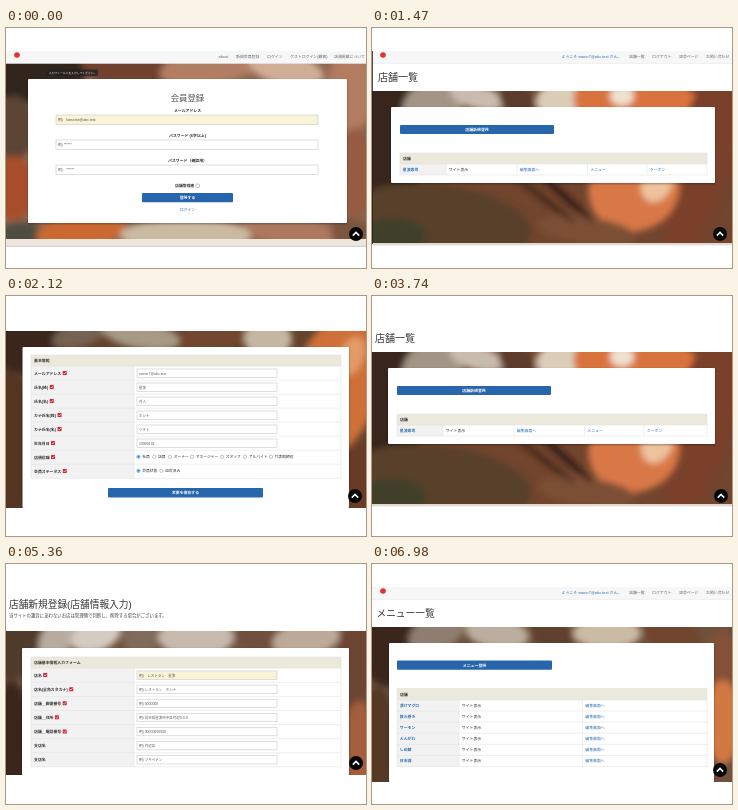
An HTML page that plays this animation: 360x240 px, repeating every 8 s.

```html
<!DOCTYPE html>
<html lang="ja">
<head>
<meta charset="utf-8">
<title>店舗管理デモ</title>
<style>
html, body { margin: 0; width: 100%; height: 100%; overflow: hidden; background: #fff; }
svg { display: block; width: 100vw; height: 100vh; }
text { font-family: "Liberation Sans", "Noto Sans CJK JP", "Noto Sans CJK", sans-serif; }
</style>
</head>
<body>
<svg id="stage" viewBox="0 0 360 240">
  <defs>
    <filter id="soft" x="-10%" y="-10%" width="120%" height="120%"><feGaussianBlur stdDeviation="3"/></filter>
    <filter id="shade"><feGaussianBlur stdDeviation="1.2"/></filter>
  </defs>
</svg>
<script>
const BLUE = '#2766ad', LINK = '#2f6db0', INK = '#333', LINE = '#ddd', HEAD = '#ebe8dc', CELL = '#f2f2f2';

const rect = (x, y, w, h, fill, extra = '') =>
  `<rect x="${x}" y="${y}" width="${w}" height="${h}" fill="${fill}" ${extra}/>`;
const text = (x, y, s, { size = 3.9, fill = INK, bold = false, anchor = 'start' } = {}) =>
  `<text x="${x}" y="${y}" font-size="${size}" fill="${fill}" text-anchor="${anchor}"${bold ? ' font-weight="700"' : ''}>${s}</text>`;
const line = (x1, y1, x2, y2, color = LINE, width = 0.5) =>
  `<path d="M${x1} ${y1}L${x2} ${y2}" stroke="${color}" stroke-width="${width}"/>`;
const ems = s => [...s].reduce((sum, c) => sum + (c < '\u0080' ? 0.34 : 1), 0);

// Soft background: blobs are [cx, cy, rx, ry, angle, color], cy measured from the top edge.
let clipCount = 0;
function photo(top, bottom, base, blobs) {
  const id = 'clip' + clipCount++;
  const shapes = blobs.map(([x, y, rx, ry, angle, color]) =>
    `<ellipse rx="${rx}" ry="${ry}" fill="${color}" transform="translate(${x} ${top + y}) rotate(${angle})"/>`);
  return `<clipPath id="${id}">${rect(0, top, 360, bottom - top, '#000')}</clipPath>
    <g clip-path="url(#${id})">${rect(0, top, 360, bottom - top, base)}
    <g filter="url(#soft)">${shapes.join('')}</g></g>`;
}

const card = (x, y, w, h) =>
  rect(x, y + 1, w, h, '#000', 'opacity=".35" filter="url(#shade)"') + rect(x, y, w, h, '#fff', 'rx="1"');

const button = (x, y, w, h, label) =>
  rect(x, y, w, h, BLUE, 'rx="1"') +
  text(x + w / 2, y + h / 2 + 1.4, label, { fill: '#fff', anchor: 'middle', bold: true });

const topButton = (x, y) =>
  `<circle cx="${x}" cy="${y}" r="7" fill="#080808"/>
   <path d="M${x - 3.2} ${y + 1.6}l3.2 -3.2l3.2 3.2" fill="none" stroke="#fff" stroke-width="1.5"/>`;

const input = (x, y, w, h, value, fill = '#fff', inset = 2) =>
  rect(x, y, w, h, fill, 'stroke="#c8c8c8" stroke-width=".6"') +
  text(x + inset, y + h / 2 + 1.3, value, { size: 3.5, fill: '#555' });

const required = (x, y) =>
  rect(x, y - 3.5, 4, 4, '#d9232e', 'rx=".5"') +
  `<path d="M${x + 0.8} ${y - 1.6}l1 1.1l1.6 -2.1" fill="none" stroke="#fff" stroke-width=".6"/>`;

const radio = (x, y, label, on) =>
  `<circle cx="${x}" cy="${y}" r="1.7" fill="#fff" stroke="${on ? '#1674d8' : '#888'}" stroke-width=".5"/>` +
  (on ? `<circle cx="${x}" cy="${y}" r="1.05" fill="#1674d8"/>` : '') +
  text(x + 3.7, y + 1.4, label, { size: 3.8 });

function nav(items) {
  return rect(0, 23, 360, 12.5, '#f7f7f7') + line(0, 35.5, 360, 35.5, '#e6e6e6') +
    '<circle cx="11" cy="27" r="2.8" fill="#e0352f"/>' +
    items.map(([x, s, fill = '#666']) => text(x, 30.2, s, { fill })).join('');
}

const memberNav = () => nav([
  [189.5, 'ようこそ owner7@abc.test さん。', LINK], [257, '店舗一覧'],
  [280, 'ログアウト'], [307, '退会ページ'], [334, 'お問い合わせ']
]);

function table(x, y, width, heading, columns, rows, headHeight, rowHeight) {
  const bodyTop = y + headHeight, bottom = bodyTop + rows.length * rowHeight;
  let out = rect(x, y, width, headHeight, HEAD) +
    rect(x, bodyTop, columns[1], bottom - bodyTop, CELL) +
    text(x + 3, y + headHeight / 2 + 1.5, heading, { bold: true });
  rows.forEach((cells, i) => {
    const rowTop = bodyTop + i * rowHeight;
    out += line(x, rowTop, x + width, rowTop);
    cells.forEach((s, j) => out += text(x + columns[j] + 2.8, rowTop + rowHeight / 2 + 1.4, s,
      { bold: j === 0, fill: j === 1 ? INK : LINK }));
  });
  columns.slice(1).forEach(c => out += line(x + c, bodyTop, x + c, bottom));
  return out + rect(x, y, width, bottom - y, 'none', `stroke="${LINE}" stroke-width=".5"`);
}

// Rows are [label, required, content(rowTop)].
function form(y, heading, rows, headHeight, rowHeight) {
  const bodyTop = y + headHeight, bottom = bodyTop + rows.length * rowHeight;
  let out = rect(25, y, 310, headHeight, HEAD) + rect(25, bodyTop, 103, bottom - bodyTop, CELL) +
    text(28, y + headHeight / 2 + 1.5, heading, { bold: true });
  rows.forEach(([label, must, content], i) => {
    const rowTop = bodyTop + i * rowHeight, base = rowTop + rowHeight / 2 + 1.3;
    out += line(25, rowTop, 335, rowTop) + text(28, base, label, { bold: true }) + content(rowTop);
    if (must) out += required(28 + ems(label) * 3.9 + 1.4, base);
  });
  return out + line(128, bodyTop, 128, bottom) +
    rect(25, y, 310, bottom - y, 'none', `stroke="${LINE}" stroke-width=".5"`);
}
const field = (value, fill) => rowTop => input(131, rowTop + 2.8, 140, 8.4, value, fill);

const sushi = [
  [15, 50, 35, 90, 0, '#38261c'], [62, 12, 34, 24, -30, '#a39585'], [105, 6, 28, 12, 15, '#c9bcae'],
  [145, 10, 20, 14, 35, '#5b3a29'], [188, 10, 24, 18, 0, '#dccdb9'], [270, 20, 70, 40, 15, '#d9733d'],
  [250, 5, 12, 10, 0, '#f0e2d0'], [330, 70, 30, 100, 15, '#7a4029'], [70, 130, 90, 36, 8, '#59402c'],
  [20, 145, 34, 18, 0, '#41402a'], [262, 98, 46, 42, -20, '#d97846'], [285, 92, 15, 20, 25, '#eec29d'],
  [215, 140, 50, 14, 8, '#7b5034'], [190, 103, 42, 3, 42, '#2c1912'], [172, 108, 40, 2.4, 38, '#3a2117']
];
const closeUp = [
  [20, 8, 46, 34, 0, '#3a271d'], [75, 2, 30, 13, -20, '#756253'], [135, 4, 40, 14, 10, '#a69a83'],
  [210, 4, 38, 16, -12, '#73472f'], [262, 8, 24, 18, 0, '#c5b7a2'], [330, 55, 42, 70, 12, '#cf7039'],
  [346, 25, 12, 20, 20, '#e39a68'], [5, 115, 22, 75, 0, '#523421'], [350, 145, 20, 32, 0, '#693a26']
];
const blurred = [
  [12, 5, 28, 45, 15, '#513a2c'], [52, 6, 16, 25, 35, '#b8aca0'], [90, 4, 26, 16, -20, '#d4cbc2'],
  [135, 6, 18, 18, 30, '#806a5c'], [190, 6, 38, 20, 0, '#c6b9ad'], [250, 4, 22, 18, 25, '#70503e'],
  [300, 8, 34, 18, -10, '#bdaa98'], [350, 30, 22, 50, 10, '#6d4532'], [5, 105, 20, 55, 0, '#3a281f'],
  [353, 115, 16, 45, 0, '#a45d3d']
];
const menuPhoto = [
  [18, 10, 35, 50, 0, '#3b281e'], [65, 5, 30, 18, -25, '#907f70'], [125, 6, 32, 16, 10, '#bcae9e'],
  [180, 8, 24, 16, 30, '#61412f'], [235, 6, 34, 16, 0, '#cbbba6'], [300, 8, 30, 18, 20, '#71452e'],
  [350, 40, 18, 36, 0, '#835139'], [351, 95, 18, 42, 0, '#d27842'], [5, 115, 20, 55, 0, '#553925']
];
const kitchen = [
  [25, 8, 55, 32, 0, '#33271f'], [120, 6, 45, 20, 8, '#713f2e'], [205, 4, 52, 17, -8, '#b27e63'],
  [280, 6, 38, 16, 12, '#d0ad95'], [345, 28, 25, 40, 0, '#b17b61'], [8, 65, 20, 32, 0, '#5b4434'],
  [8, 125, 20, 32, 0, '#a74d2b'], [350, 110, 16, 45, 0, '#955c43'], [15, 173, 25, 14, 0, '#504e43'],
  [75, 168, 45, 18, -8, '#cb6932'], [180, 172, 66, 16, 0, '#cbbaa2'], [285, 168, 48, 16, 10, '#ad785d'],
  [345, 170, 20, 15, 0, '#7a5541']
];

const center = (y, s, style) => text(181.5, y, s, { anchor: 'middle', ...style });

function signUp() {
  return photo(35, 211, '#8f6650', kitchen) + rect(0, 211, 360, 7, '#eee7de') +
    line(0, 218.3, 360, 218.3, '#999') +
    nav([[212.5, 'about'], [230, '新規会員登録'], [261, 'ログイン'], [284, 'ゲストログイン(顧客)'], [328, '店頭掲載について']]) +
    rect(41, 41.5, 51, 6.5, '#222', 'opacity=".75" rx="1"') +
    text(43, 46, '入力フィールドを入力してください。', { size: 2.8, fill: '#fff' }) +
    card(22, 51, 319, 144) +
    center(73, '会員登録', { size: 8.4, fill: '#555' }) +
    center(84, 'メールアドレス', { bold: true }) +
    input(50, 87, 262, 9.5, '例)　kamome@abc.test', '#f9f3d8') +
    center(109, 'パスワード (6字以上)', { bold: true }) +
    input(50, 112, 262, 9.5, '例) ******') +
    center(134, 'パスワード（確認用）', { bold: true }) +
    input(50, 137, 262, 9.5, '例)　******') +
    text(169, 159.2, '店舗管理者', { bold: true }) +
    rect(190, 156, 3.4, 3.4, '#fff', 'stroke="#888" stroke-width=".5" rx=".5"') +
    button(136, 165, 91, 9.2, '登録する') +
    center(183, 'ログイン', { fill: LINK }) + topButton(350, 206);
}

function shopList(dx, dy, withNav) {
  const x = 28 + dx, y = dy;
  return photo(63 + y, 215 + y, '#71452e', sushi) +
    rect(0, 215 + y, 360, 1.2, '#e5d7c4') + line(0, 216.8 + y, 360, 216.8 + y, '#aaa') +
    (withNav ? memberNav() + rect(0, 23, 0.8, 193, '#222') : '') +
    text(6 + dx, 53 + y, '店舗一覧', { size: 10 }) +
    card(19 + dx, 79 + y, 324 - dx, 76) +
    button(x, 97 + y, 154, 9, '店舗新規登録') +
    table(x, 125 + y, 307 - dx, '店舗', [0, 46, 117, 187.5, 247],
      [['星波寿司', 'サイト表示', '編集画面へ', 'メニュー', 'クーポン']], 11, 11) +
    topButton(withNav ? 348 : 349, withNav ? 206 : 200);
}

function profile() {
  const jobs = [[132.5, '社員'], [148.3, '店員'], [164, 'オーナー'], [186, 'マネージャー'],
    [216, 'スタッフ'], [239, 'アルバイト'], [265, '代表取締役']];
  const choices = items => top => items.map(([x, s], i) => radio(x, top + 6.6, s, i === 0)).join('');
  return photo(35, 212, '#66432f', closeUp) + card(16.5, 51, 326.5, 161) +
    form(59, '基本情報', [
      ['メールアドレス', true, field('owner7@abc.test')],
      ['氏名(姓)', true, field('星波')],
      ['氏名(名)', true, field('月人')],
      ['カナ氏名(姓)', true, field('ホシナ')],
      ['カナ氏名(名)', true, field('ツキト')],
      ['生年月日', true, field('19900101')],
      ['店頭役職', true, choices(jobs)],
      ['会員ステータス', true, choices([[132.5, '会員状態'], [155.3, '退会済み']])]
    ], 11.2, 14) +
    button(102, 192, 155, 9.6, '変更を保存する') + rect(0, 212, 360, 28, '#fff') + topButton(349, 200);
}

function newShop() {
  return photo(67, 211, '#735440', blurred) +
    text(3, 44.3, '店舗新規登録(店舗情報入力)', { size: 9.7 }) +
    text(3, 53, '当サイトの趣旨にあわないお店は管理側で判断し、削除する場合がございます。', { size: 4.4, fill: '#444' }) +
    card(16, 84, 327, 127) +
    form(93, '店舗基本情報入力フォーム', [
      ['店名', true, field('例)　レストラン　星波', '#f9f3d8')],
      ['店名(全角カタカナ)', true, field('例) レストラン　ホシナ')],
      ['店舗＿郵便番号', true, field('例) 0000000')],
      ['店舗＿住所', true, field('例) 見本県星波市中区月辺0-0-0')],
      ['店舗＿電話番号', true, field('例) 00000000000')],
      ['支店名', false, field('例) 月辺店')],
      ['支店名', false, field('例) ツキベテン')]
    ], 11.2, 14.1) + rect(0, 211, 360, 29, '#fff') + topButton(350, 199);
}

function menuList() {
  const names = ['漬けマグロ', '鉄火巻き', 'サーモン', 'えんがわ', 'しめ鯖', '日本酒'];
  return photo(63, 218, '#70513e', menuPhoto) + memberNav() +
    text(4.5, 52.5, 'メニュー一覧', { size: 9.7 }) +
    card(17, 79, 325, 139) + button(25, 96.5, 155, 9.2, 'メニュー登録') +
    table(25, 124.5, 310, '店舗', [0, 62, 185.5],
      names.map(name => [name, 'サイト表示', '編集画面へ']), 11.4, 11.1) +
    rect(0, 218, 360, 22, '#fff') + topButton(348, 206);
}

const LOOP = 8000;
const scenes = [
  [0, signUp()], [500, shopList(0, 0, true)], [2120, profile()],
  [3740, shopList(-3, -7, false)], [5360, newShop()], [6980, menuList()]
];
const stage = document.getElementById('stage');
stage.insertAdjacentHTML('beforeend', scenes.map(([, body]) => `<g class="scene">${body}</g>`).join(''));
const groups = [...stage.querySelectorAll('.scene')];

const start = performance.now();
function render(now) {
  const time = Math.max(0, now - start) % LOOP;
  const current = scenes.filter(([from]) => from <= time).length - 1;
  groups.forEach((group, i) => { group.style.display = i === current ? '' : 'none'; });
  requestAnimationFrame(render);
}
render(start);
</script>
</body>
</html>
```
